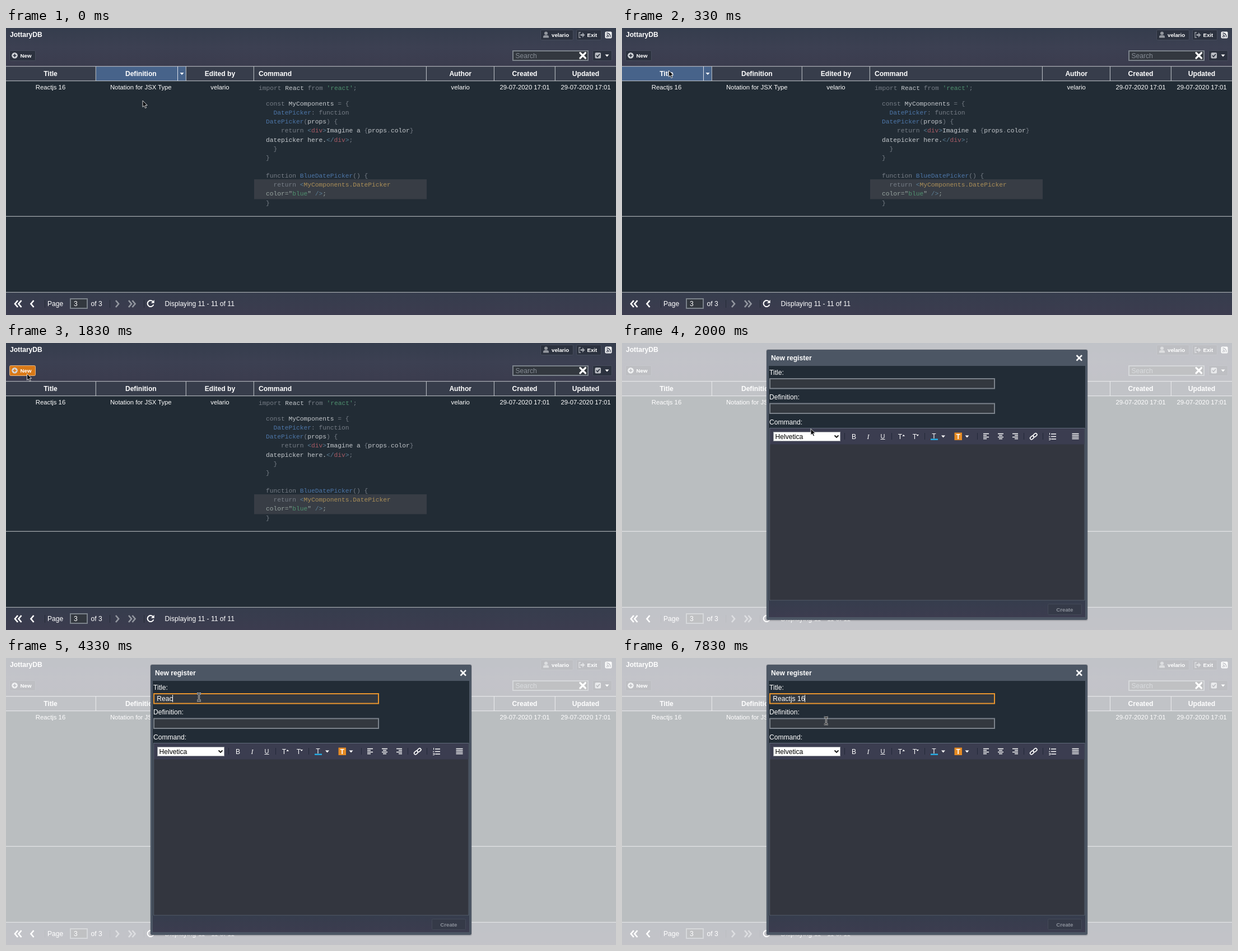
An HTML page for the animation above (8 s loop, 1089 by 514 pixels).

```html
<!DOCTYPE html>
<html lang="en">
<head>
<meta charset="utf-8">
<title>Register grid</title>
<style>
html, body { margin: 0; width: 100%; height: 100%; overflow: hidden; background: #222c35; }
svg { display: block; width: 100vw; height: 100vh; }
text { font: 12.1px "Liberation Sans", Arial, sans-serif; fill: #fff; white-space: pre; }
.cell { font-size: 11.3px; }
.bold { font-weight: bold; }
.small { font-size: 9.7px; font-weight: bold; }
.code { font: 11.25px "Liberation Mono", monospace; }
.mid { text-anchor: middle; }
.k { fill: #767d86; } .w { fill: #c6cace; } .f { fill: #4d76a8; } .s { fill: #4f916f; }
.t { fill: #a95c66; } .b { fill: #5b7f97; } .g { fill: #ab8f58; } .a { fill: #98a5a0; }
.line { fill: none; stroke: #fff; }
.rule { stroke: #d5d8dc; stroke-width: .9; }
.btn { fill: #2c323f; stroke: #474d5c; }
.field { fill: #33383f; stroke: #7b828b; stroke-width: 2; }
</style>
</head>
<body>
<svg id="stage" viewBox="0 0 1089 514" preserveAspectRatio="none">
  <defs>
    <linearGradient id="top" x2="0" y2="1">
      <stop stop-color="#353d4d"/><stop offset=".5" stop-color="#3c4052"/><stop offset="1" stop-color="#3b3c4e"/>
    </linearGradient>
    <linearGradient id="foot" x2="0" y2="1">
      <stop stop-color="#363d4d"/><stop offset="1" stop-color="#3c3c4f"/>
    </linearGradient>
    <path id="beamShape" d="M-3.5-6.5q3.500 0 3.500 1.500 0-1.500 3.500-1.500M0-5.500v11M-3.500 6.500q3.500 0 3.500-1.500 0 1.500 3.500 1.500"/>
  </defs>

  <rect width="1089" height="514" fill="#222c35"/>
  <rect width="1089" height="69" fill="url(#top)"/>
  <text class="bold" x="7" y="16.3">JottaryDB</text>

  <g id="userBar">
    <rect class="btn" x="954.5" y="3.5" width="58" height="18" rx="2"/>
    <g fill="#92969d"><circle cx="964" cy="9.6" r="3"/><path d="M959 17.5v-2q0-2.5 3-2.5h4q3 0 3 2.5v2z"/></g>
    <text class="small" x="974" y="15.8">velario</text>
    <rect class="btn" x="1018.5" y="3.5" width="44" height="18" rx="2"/>
    <path d="M1026 8h-3v9h3" fill="none" stroke="#9a9ea6" stroke-width="1.3"/>
    <path d="M1025.5 11h3.5v-3l4.5 4.5-4.5 4.5v-3h-3.5z" fill="#9a9ea6"/>
    <text class="small" x="1037.5" y="15.8">Exit</text>
    <rect x="1069.5" y="6.5" width="12" height="12" rx="2" fill="#f4f5f7"/>
    <path d="M1072 9q7 0 7 7.5M1072 12.2q4 0 4 4.3" fill="none" stroke="#3a4050" stroke-width="1.4"/>
    <circle cx="1073" cy="15.5" r="1.2" fill="#3a4050"/>
  </g>

  <rect id="newBtn" class="btn" x="6.5" y="40.5" width="46" height="18" rx="2"/>
  <circle cx="15.5" cy="49.3" r="5.3" fill="#d5d8dc"/>
  <path id="plus" d="M12.5 49.3h6M15.5 46.3v6" stroke="#2c323f" stroke-width="1.8"/>
  <text class="small" x="25.5" y="52.6">New</text>

  <rect class="field" x="905" y="41" width="134" height="17"/>
  <text x="909.5" y="53.5" style="fill:#858b94">Search</text>
  <path class="line" d="M1025 44.5l9.5 9.5m0-9.5l-9.5 9.5" stroke-width="3.2" stroke-linecap="round"/>
  <rect class="btn" x="1047.5" y="40.5" width="34" height="18" rx="2"/>
  <rect x="1051.5" y="44" width="10.5" height="10.5" rx="2" fill="#b9bcc2"/>
  <path d="M1053.8 49l2.2 2.4 4-4.6" fill="none" stroke="#2c323f" stroke-width="1.7"/>
  <path d="M1069.5 47.5h7l-3.5 4z" fill="#fff"/>

  <rect y="69" width="1089" height="26" fill="#373d4b"/>
  <g id="headHover">
    <rect y="69" width="160" height="26" fill="#47638a"/>
    <path class="line" d="M145.500 69v26" stroke-opacity=".8"/>
    <path d="M149.500 80h7l-3.500 4z" fill="#fff"/>
  </g>
  <path class="rule" d="M0 68.700h1089M0 94.700h1089M160.300 69v26M321.300 69v26M442.300 69v26M750.400 69v26M871.400 69v26M980.300 69v26"/>
  <path class="rule" d="M0 337.300h1089M0 473.300h1089"/>
  <rect id="rowHover" y="95.500" width="1089" height="242.300" fill="#7f56ee"/>
  <rect x="443" y="271" width="308" height="35.500" fill="#383d45"/>
  <g id="cells"></g>

  <rect y="474" width="1089" height="40" fill="url(#foot)"/>
  <g class="line" stroke-width="2.7">
    <path d="M21 488l-5 6 5 6M27.5 488l-5 6 5 6M49.5 488l-5 6 5 6"/>
    <path d="M196 488l5 6-5 6M219 488l5 6-5 6M225.5 488l5 6-5 6" stroke="#92969f"/>
    <path d="M262.5 490.2a5.5 5.5 0 1 0 .9 5" stroke-width="2"/>
  </g>
  <path d="M264.7 487v5.800h-5.800z" fill="#fff"/>
  <path d="M69.500 487v14M185.500 487v14M246.500 487v14" stroke="#252b37"/>
  <text x="74" y="497.800">Page</text>
  <rect class="field" x="115" y="485" width="30" height="17"/>
  <text x="121" y="497.800">3</text>
  <text x="151.500" y="497.800">of 3</text>
  <text x="283.500" y="497.800">Displaying 11 - 11 of 11</text>

  <g id="dialog">
    <rect width="1089" height="514" fill="#fff" fill-opacity=".69"/>
    <rect x="257" y="11" width="575" height="487" rx="4" fill="#000" fill-opacity=".12"/>
    <rect x="258" y="12" width="573" height="484" rx="3" fill="#4c5664"/>
    <text class="bold" x="266" y="31">New register</text>
    <path class="line" d="M811.5 22l9.5 9.5m0-9.5l-9.5 9.5" stroke-width="2.5"/>
    <rect x="262" y="41" width="565" height="450" fill="#222c36"/>
    <text x="263" y="56.5">Title:</text>
    <text x="263" y="101">Definition:</text>
    <text x="263" y="145.5">Command:</text>
    <rect id="titleField" class="field" x="264" y="64" width="401" height="17.5"/>
    <rect class="field" x="264" y="108.5" width="401" height="17.5"/>
    <text id="typed" x="269.3" y="77"></text>
    <rect id="caret" y="66" width="1" height="13" fill="#fff"/>
    <rect x="263.5" y="152.5" width="562.5" height="308.5" fill="#33363f" stroke="#606a7a"/>
    <rect x="264" y="153" width="561.5" height="28.5" fill="#3b3d50"/>
    <rect x="262" y="461.5" width="565" height="29.5" fill="url(#foot)"/>
    <rect x="760.5" y="467.5" width="60" height="19" rx="2" fill="#353a48" stroke="#444a58"/>
    <text class="small" x="775.3" y="480.7" style="fill:#8b909a">Create</text>

    <rect x="270.5" y="159.5" width="119" height="16" fill="#fff" stroke="#9da0a6"/>
    <text x="273.5" y="172" style="fill:#000">Helvetica</text>
    <path d="M379.5 165.5l3.5 3.5 3.5-3.5" fill="none" stroke="#111" stroke-width="1.8"/>
    <path d="M397.5 161v12M481.5 161v12M540.5 161v12M634.5 161v12M717.5 161v12M751.5 161v12" stroke="#222838"/>
    <g class="mid bold">
      <text x="414" y="171.5">B</text>
      <text x="439.5" y="171.5" style="font-family:'Liberation Serif',serif;font-style:italic">I</text>
      <text x="465.5" y="170.5" style="font-size:11px">U</text>
      <text x="496.5" y="171.5">T</text>
      <text x="522.5" y="171.5">T</text>
      <text x="557" y="170.5">T</text>
    </g>
    <path class="line" d="M461.5 172.5h8"/>
    <path d="M500.5 167l2.2-3 2.2 3zM525.5 164h4.4l-2.2 3zM570 165.5h7l-3.5 4zM612.5 165.5h7l-3.5 4z" fill="#fff"/>
    <rect x="551" y="171.5" width="13" height="2.3" fill="#25b5ee"/>
    <rect x="593.5" y="160.5" width="13.5" height="13.5" fill="#e58a23"/>
    <text class="mid bold" x="600.3" y="171.8">T</text>
    <path id="aligns" class="line" stroke-width="1.5"/>
    <g class="line" stroke-width="1.6">
      <rect x="-3.7" y="-2.4" width="7.4" height="4.8" rx="2.4" transform="translate(732 169.5) rotate(-42)"/>
      <rect x="-3.7" y="-2.4" width="7.4" height="4.8" rx="2.4" transform="translate(737.5 165) rotate(-42)"/>
    </g>
    <path class="line" d="M766 163h9M766 167.5h9M766 172h9" stroke-width="1.6"/>
    <path class="line" d="M763.5 161v3.5M762 167.5h2.5M762 170.5h2.5v3h-2.5"/>
  </g>

  <path id="arrow" d="M0 0v11.5l2.6-2.3 2 4.3 2-.9-2-4.2h3.6z" fill="#0b0d10" stroke="#fff" stroke-width=".8"/>
  <g id="beam" fill="none">
    <use href="#beamShape" stroke="#fff" stroke-width="2.8"/>
    <use href="#beamShape" stroke="#000" stroke-width="1.2"/>
  </g>
</svg>
<script>
const LOOP = 8000;
const $ = id => document.getElementById(id);
const NS = "http://www.w3.org/2000/svg";

function label(text, x, y, cls, parent = $("cells")) {
  const el = document.createElementNS(NS, "text");
  el.setAttribute("x", x);
  el.setAttribute("y", y);
  el.setAttribute("class", cls);
  el.textContent = text;
  parent.append(el);
  return el;
}

const columns = [
  ["Title", "Reactjs 16", 79.5], ["Definition", "Notation for JSX Type", 240.8],
  ["Edited by", "velario", 382], ["Author", "velario", 811.2],
  ["Created", "29-07-2020 17:01", 926], ["Updated", "29-07-2020 17:01", 1035]
];
for (const [head, value, x] of columns) {
  label(head, x, 86.1, "bold mid");
  label(value, x, 110, "cell mid");
}
label("Command", 451, 86.1, "bold");

// Each line: x, baseline, then "class:text" tokens
const code = [
  [451, 110.7, "k:import ", "w:React ", "k:from ", "s:'react'", "k:;"],
  [464, 139.1, "k:const ", "w:MyComponents ", "k:= {"],
  [464, 155.2, "f:  DatePicker", "k:: function"],
  [464, 171.3, "f:DatePicker", "k:(", "w:props", "k:) {"],
  [464, 187.4, "k:    return ", "b:<", "t:div", "b:>", "w:Imagine a ", "k:{", "w:props", "k:.", "w:color", "k:}"],
  [464, 203.5, "w:datepicker here.", "b:</", "t:div", "b:>", "k:;"],
  [464, 219.6, "k:  }"],
  [464, 235.7, "k:}"],
  [464, 268.1, "k:function ", "f:BlueDatePicker", "k:() {"],
  [464, 284.2, "k:  return ", "b:<", "g:MyComponents.DatePicker"],
  [464, 300.3, "a:color=\"", "s:blue", "a:\" ", "b:/>", "a:;"],
  [464, 316.5, "k:}"]
];
for (const [x, y, ...tokens] of code) {
  const line = label("", x, y, "code");
  for (const token of tokens) {
    const span = document.createElementNS(NS, "tspan");
    span.setAttribute("class", token[0]);
    span.textContent = token.slice(2);
    line.append(span);
  }
}

// Alignment icons: left, centre, right, justified
$("aligns").setAttribute("d", [[645, 0], [671, .5], [697, 1], [803.5, 0]].map(([x, shift], i) =>
  [0, 1, 2, 3].map(row => {
    const full = i === 3 ? 12 : 10;
    const w = i < 3 && row % 2 ? 6 : full;
    return `M${x + (full - w) * shift} ${162.5 + row * 3}h${w}`;
  }).join("")).join(""));

// Pointer: time, x, y, I-beam?
const pointer = [
  [0, 244, 130], [170, 152, 128], [330, 83.5, 76], [500, 66, 66], [670, 52, 60],
  [830, 44, 57], [1000, 40, 56], [1170, 38, 55], [1670, 37.5, 55], [1830, 37.5, 55],
  [2000, 337, 153.5], [2170, 345, 110, 1], [2330, 346, 86], [2500, 345, 73, 1], [2670, 344.5, 70, 1],
  [7330, 347, 74, 1], [7500, 355, 90], [7670, 363, 109, 1], [7830, 364.3, 112.3, 1]
];
const hover = [[0, "definition"], [170, "row"], [330, "title"], [670, ""], [830, "new"], [2000, ""]];
// Typed text and whether the caret shows
const typing = [
  [0, "", 0], [2830, "", 1], [3670, "R", 1], [3830, "Re", 1], [4330, "Reac", 1],
  [5170, "Reac", 0], [5330, "React", 1], [5830, "Reactjs", 1], [6170, "Reactjs ", 1],
  [6330, "Reactjs 1", 1], [6670, "Reactjs 16", 1], [7330, "Reactjs 16", 0], [7830, "Reactjs 16", 1]
];
const border = [[0, "#7b828b"], [2830, "#a98850"], [3000, "#d28f3c"], [3170, "#e8952e"]];

const at = (steps, t) => steps.findLast(step => step[0] <= t);
const show = (id, on) => $(id).style.display = on ? "" : "none";

function draw(t) {
  const [, over] = at(hover, t);
  show("headHover", over === "title" || over === "definition");
  $("headHover").setAttribute("transform", `translate(${over === "definition" ? 161 : 0} 0)`);
  show("rowHover", over === "row");
  const hot = over === "new";
  $("newBtn").style.fill = hot ? "#d97917" : "";
  $("newBtn").style.stroke = hot ? "#e6b98a" : "";
  $("plus").style.stroke = hot ? "#d97917" : "";

  show("dialog", t >= 2000);
  const [, text, caret] = at(typing, t);
  $("typed").textContent = text;
  $("titleField").style.stroke = at(border, t)[1];
  show("caret", caret);
  if (caret) $("caret").setAttribute("x", Math.floor(269.3 + $("typed").getComputedTextLength()));

  const [, x, y, beam] = at(pointer, t);
  show("arrow", !beam);
  show("beam", beam);
  $(beam ? "beam" : "arrow").setAttribute("transform", `translate(${x} ${y})`);
}

const start = performance.now();
function tick() {
  draw((performance.now() - start) % LOOP);
  requestAnimationFrame(tick);
}
tick();
</script>
</body>
</html>
```
